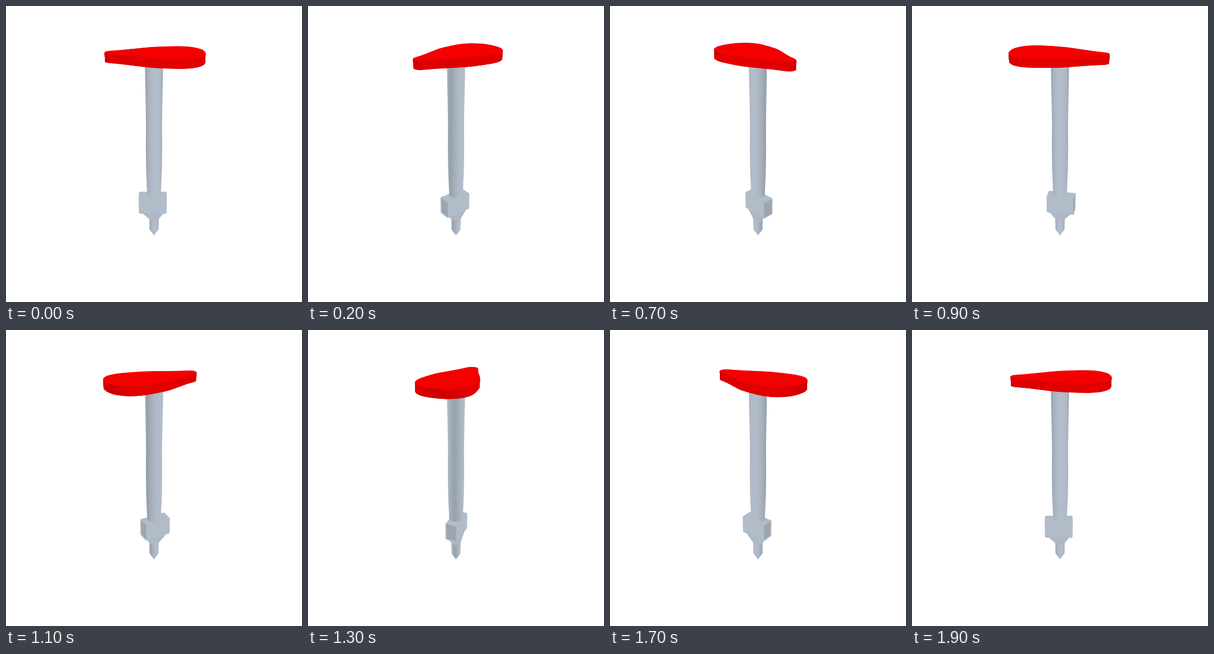
An HTML page with a canvas for the animation above (2000 ms loop, 512x512 px).

```html
<!DOCTYPE html>
<html lang="en">
<head>
<meta charset="utf-8">
<title>Turning tool</title>
<style>
  html, body { margin: 0; width: 100%; height: 100%; overflow: hidden; background: #fff; }
  canvas { display: block; width: 100vmin; height: 100vmin; }
</style>
</head>
<body>
<canvas id="stage" width="512" height="512"></canvas>
<script>
const ctx = document.getElementById('stage').getContext('2d');
const FRAMES = 20, STEP = 100;
const DIST = 4, FOCAL = 256 / Math.tan(0.35);
const SIN = Math.sqrt(0.2), COS = Math.sqrt(0.8);   // camera elevation
const LIGHT = [.212, -.977];                        // two-sided, turns with the tool

// Seat half outline: position along its length, half width
const SEAT = [[-.43, 0], [-.422, .032], [-.385, .057], [-.3, .087], [-.18, .142],
  [-.06, .198], [.03, .226], [.2, .25], [.3, .237], [.37, .198], [.422, .13], [.443, .06], [.447, 0]];
const SEAT_TOP = .995, SEAT_BASE = .918;

// Pole half widths at screen heights
const POLE = [[95, 15.8], [125, 15.4], [160, 14.6], [200, 13.9], [250, 14.1],
  [285, 13.6], [305, 12.7], [327, 11.8]];

const BOX = { a0: -.147, a1: .121, b0: -.054, b1: .054, low: -.659, high: -.483 };

let angle = 0;

function project([a, b, h]) {
  const s = Math.sin(angle), c = Math.cos(angle);
  const x = a * c - b * s, near = -a * s - b * c;
  const k = FOCAL / (DIST - near * COS - h * SIN);
  return [256 + x * k, 256 - (h * COS - near * SIN) * k];
}

function trace(points) {
  ctx.beginPath();
  points.forEach(([x, y]) => ctx.lineTo(x, y));
  ctx.closePath();
}

function paint(points, fill, edge = 0) {
  trace(points);
  ctx.fillStyle = ctx.strokeStyle = fill;
  ctx.fill();
  if (edge) {
    ctx.lineWidth = edge;
    ctx.lineJoin = 'round';
    ctx.stroke();
  }
}

function hull(points) {
  const sorted = [...points].sort((p, q) => p[0] - q[0] || p[1] - q[1]);
  const chain = list => {
    const out = [];
    for (const p of list) {
      while (out.length > 1) {
        const [o, m] = out.slice(-2);
        if ((m[0] - o[0]) * (p[1] - o[1]) - (m[1] - o[1]) * (p[0] - o[0]) > 0) break;
        out.pop();
      }
      out.push(p);
    }
    return out.slice(0, -1);
  };
  return [...chain(sorted), ...chain(sorted.reverse())];
}

function smooth(points, parts) {
  const n = points.length, out = [];
  for (let i = 0; i < n; i++) {
    const [p, q, r, s] = [-1, 0, 1, 2].map(d => points[(i + d + n) % n]);
    for (let j = 0; j < parts; j++) {
      const t = j / parts;
      out.push([0, 1].map(k => q[k] + t / 2 * (r[k] - p[k] +
        t * (2 * p[k] - 5 * q[k] + 4 * r[k] - s[k] + t * (3 * (q[k] - r[k]) + s[k] - p[k])))));
    }
  }
  return out;
}

const outline = smooth([...SEAT, ...SEAT.slice(1, -1).reverse().map(([a, w]) => [a, -w])], 5);

const shade = (a, b) => Math.abs(a * LIGHT[0] + b * LIGHT[1]);

function steel(a, b) {
  const t = shade(a, b);
  return `rgb(${[150, 160, 170].map((v, i) => Math.round(v + [28, 29, 32][i] * t))})`;
}

// Shading across an upright cylinder
function metal(left, right) {
  const g = ctx.createLinearGradient(left, 0, right, 0);
  for (let i = 0; i <= 16; i++) {
    const turn = Math.asin(i / 8 - 1) - angle;
    g.addColorStop(i / 16, steel(Math.sin(turn), -Math.cos(turn)));
  }
  return g;
}

function drawTip() {
  paint([[247.8, 360], [248.6, 386.5], [256, 396.5], [263.4, 386.5], [264.2, 360]], metal(248, 264), .6);
}

function drawBox() {
  const { a0, a1, b0, b1, low, high } = BOX;
  const ring = h => [[a0, b0, h], [a1, b0, h], [a1, b1, h], [a0, b1, h]];
  const neck = [];
  for (let i = 0; i < 12; i++) {
    const t = i * Math.PI / 6;
    neck.push([.044 * Math.cos(t), .044 * Math.sin(t), -.768]);
  }
  const base = ring(low).map(([a, b, h]) => [a * .85, b * .9, h]);
  paint(hull([...base, ...neck].map(project)), '#aeb8c5', 2);
  paint(hull([...ring(low), ...ring(high)].map(project)), '#b2bbc7', 3.6);

  const camA = -DIST * COS * Math.sin(angle), camB = -DIST * COS * Math.cos(angle);
  const side = (p, q, fill) =>
    paint([[...p, low], [...q, low], [...q, high], [...p, high]].map(project), fill);
  const long = steel(0, 1), end = steel(1, 0);
  if (camB < b0) side([a0, b0], [a1, b0], long);
  if (camB > b1) side([a0, b1], [a1, b1], long);
  if (camA < a0) side([a0, b0], [a0, b1], end);
  if (camA > a1) side([a1, b0], [a1, b1], end);
}

function drawPole() {
  const [endY, endR] = POLE[POLE.length - 1];
  ctx.beginPath();
  POLE.forEach(([y, r]) => ctx.lineTo(256 - r, y));
  ctx.ellipse(256, endY, endR, 4.5, 0, Math.PI, 0, true);
  [...POLE].reverse().forEach(([y, r]) => ctx.lineTo(256 + r, y));
  ctx.closePath();
  ctx.fillStyle = metal(241, 271);
  ctx.fill();
}

function drawSeat() {
  const top = outline.map(p => project([...p, SEAT_TOP]));
  const base = outline.map(p => project([...p, SEAT_BASE]));
  paint(base, '#d80000', 1);
  top.forEach((p, i) => {
    const j = (i + 1) % top.length;
    const da = outline[j][0] - outline[i][0], db = outline[j][1] - outline[i][1];
    const len = Math.hypot(da, db);
    const red = Math.round(204 + 22 * shade(db / len, -da / len));
    paint([p, top[j], base[j], base[i]], `rgb(${red},0,0)`, .8);
  });
  paint(top, '#f40000', .6);
}

function draw(now) {
  const frame = Math.floor(now / STEP) % FRAMES;
  angle = frame % (FRAMES - 1) * 2 * Math.PI / (FRAMES - 1);
  ctx.filter = 'none';
  ctx.fillStyle = '#fff';
  ctx.fillRect(0, 0, 512, 512);
  ctx.filter = 'blur(0.7px)';
  drawTip();
  drawBox();
  drawPole();
  ctx.filter = 'none';
  drawSeat();
}

function tick() {
  draw(performance.now());
  requestAnimationFrame(tick);
}
tick();
</script>
</body>
</html>
```
